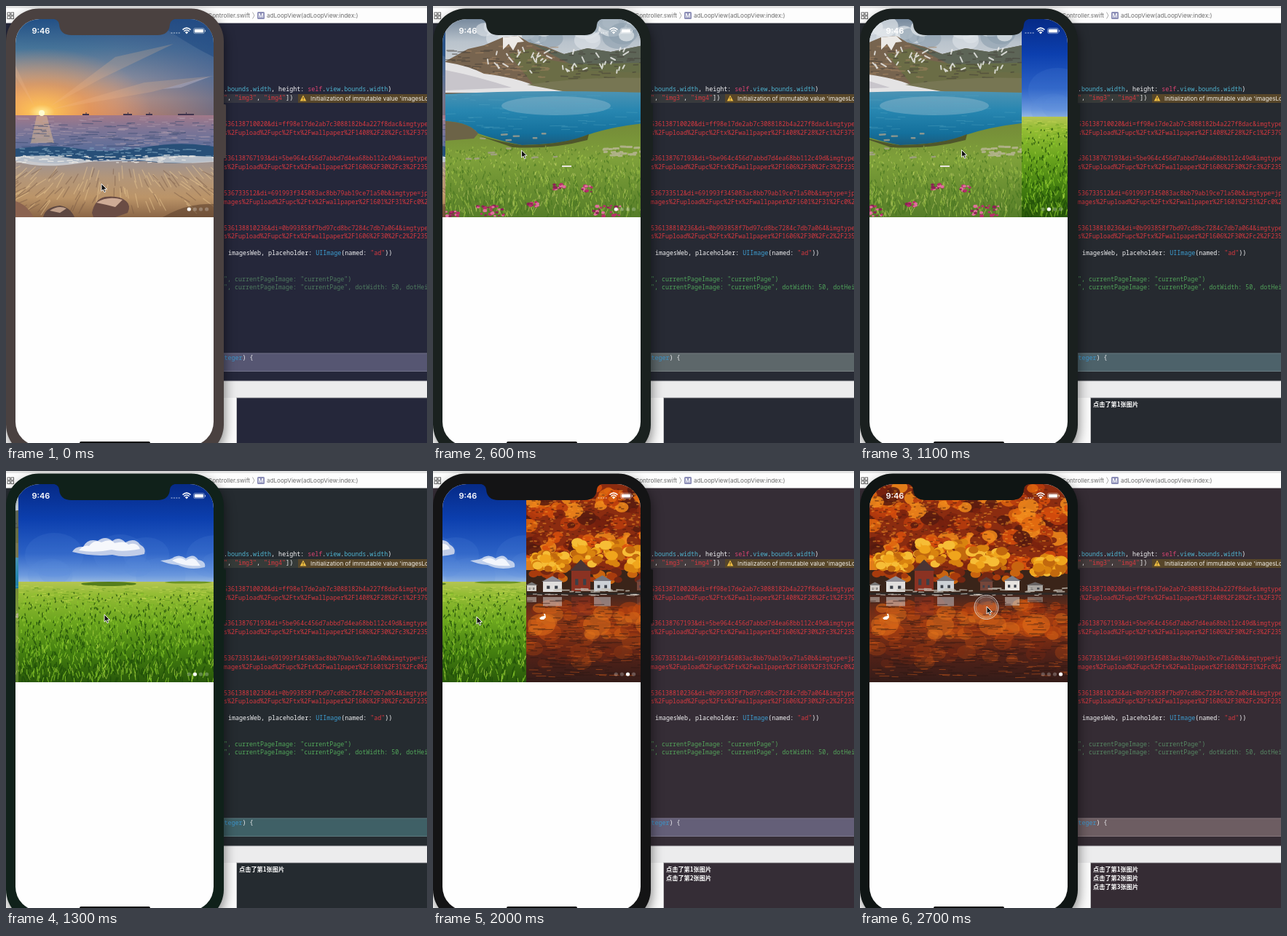
These frames come from a looping animation (578 px wide and 600 px high, 2800 ms). An HTML page:

```html
<!DOCTYPE html>
<html lang="en">
<head>
<meta charset="utf-8">
<title>Ad loop view</title>
<style>
html, body { margin: 0; width: 100%; height: 100%; overflow: hidden; background: #25273a; }
svg { display: block; }
text { white-space: pre; }
.ui { font-family: Inter, sans-serif; font-size: 8.1px; }
.code { font: 500 8.36px "Noto Sans Mono", monospace; }
.log { font: 700 8.2px "Noto Sans CJK SC", "Noto Sans CJK", sans-serif; fill: #fff; }
</style>
</head>
<body>
<svg id="stage" width="578" height="600" viewBox="0 0 578 600"></svg>
<script>
const LOOP = 2800, STEP = 100, PAGE = 272;
const stage = document.getElementById('stage');

let seed = 7;
function rnd() {
  seed = (seed + 0x6D2B79F5) | 0;
  let v = Math.imul(seed ^ (seed >>> 15), 1 | seed);
  v = (v + Math.imul(v ^ (v >>> 7), 61 | v)) ^ v;
  return ((v ^ (v >>> 14)) >>> 0) / 4294967296;
}
const span = (a, b) => a + rnd() * (b - a);
const f = v => v.toFixed(1);
const esc = s => s.replace(/&/g, '&amp;').replace(/</g, '&lt;');

const rect = (x, y, w, h, fill, more = '') =>
  `<rect x="${x}" y="${y}" width="${w}" height="${h}" fill="${fill}" ${more}/>`;
const ell = (x, y, rx, ry, fill, more = '') =>
  `<ellipse cx="${f(x)}" cy="${f(y)}" rx="${f(rx)}" ry="${f(ry)}" fill="${fill}" ${more}/>`;
const path = (d, fill, more = '') => `<path d="${d}" fill="${fill}" ${more}/>`;
const stops = list => list.map(([o, c, a = 1]) =>
  `<stop offset="${o}" stop-color="${c}" stop-opacity="${a}"/>`).join('');
const down = (id, list) => `<linearGradient id="${id}" x2="0" y2="1">${stops(list)}</linearGradient>`;
const across = (id, list) => `<linearGradient id="${id}">${stops(list)}</linearGradient>`;
const glow = (id, list) => `<radialGradient id="${id}">${stops(list)}</radialGradient>`;

// many short strokes of one colour in a single path
function strokes(n, color, width, mark, alpha = 1) {
  let d = '';
  for (let i = 0; i < n; i++) d += mark();
  return path(d, 'none', `stroke="${color}" stroke-width="${width}" stroke-opacity="${alpha}" stroke-linecap="round"`);
}
const line = (x, y, dx, dy) => `M${f(x)} ${f(y)}l${f(dx)} ${f(dy)}`;
const dashes = (n, color, w, y0, y1, min, max, alpha, x0 = 13, x1 = 285) =>
  strokes(n, color, w, () => line(span(x0, x1), span(y0, y1), span(min, max), span(-.5, .5)), alpha);
const blades = (n, color, w, y0, y1, alpha) => strokes(n, color, w, () => {
  const k = rnd(), y = y0 + (y1 - y0) * k;
  return line(span(13, 285), y, span(-3, 3) * (k + .2), -1 - 6 * k);
}, alpha);
function blobs(n, colors, x0, x1, y0, y1, r0, r1, alpha = 1) {
  let s = '';
  for (let i = 0; i < n; i++) {
    const r = span(r0, r1);
    s += ell(span(x0, x1), span(y0, y1), r, r * .75, colors[i % colors.length], `opacity="${alpha}"`);
  }
  return s;
}

function sunset() {
  const ship = (x, w) => rect(x, 148, w, 2, '#40354d') + rect(x + w / 2, 146, 1, 3, '#40354d');
  return rect(13, 18, PAGE, 133, 'url(#dusk)') +
    rect(13, 18, PAGE, 133, 'url(#east)') +
    ell(49, 146, 150, 88, 'url(#sunlight)') +
    path('M40 140L13 96V82ZM60 138L150 70 230 52 130 100ZM62 142L190 105 285 96 200 118Z', '#f2b98c', 'opacity=".22"') +
    path('M200 18H285V70Q245 50 200 18Z', '#123f7c', 'opacity=".4"') +
    path('M215 114L262 101 280 97 240 112Z', '#b5b0c2', 'opacity=".5"') +
    rect(13, 150, PAGE, 68, 'url(#sea)') +
    ell(49, 147, 4, 4, '#fffbd0') +
    path('M42 151H56L66 188H34Z', '#ffd08a', 'opacity=".4"') +
    ship(105, 9) + ship(161, 12) + ship(192, 9) + ship(236, 22) +
    dashes(130, '#b5a2b0', 1, 153, 192, 4, 16, .5) +
    dashes(90, '#34466f', 1.2, 158, 194, 5, 18, .5) +
    rect(13, 213, PAGE, 77, 'url(#sand)') +
    path('M13 196Q60 189 100 196T190 194T285 193V212Q235 219 190 213T100 214T13 208Z', '#274f78') +
    dashes(90, '#86abc2', 1.4, 194, 209, 2, 8, .6) +
    path('M13 207Q55 203 96 210T180 210T285 207V214Q238 218 196 213T100 216T13 213Z', '#d0d3d7', 'opacity=".85"') +
    dashes(80, '#f1eee8', 1.3, 205, 215, 2, 8, .8) +
    strokes(70, '#f0ce98', 1.2, () => {
      const x = span(13, 285), y = span(219, 272);
      return line(x, y, (x - 150) * .14, span(8, 20));
    }, .45) +
    strokes(60, '#6e523f', 1.3, () => {
      const x = span(13, 285), y = span(220, 274);
      return line(x, y, (x - 150) * .13, span(6, 16));
    }, .4) +
    path('M118 284Q122 265 136 262 156 260 165 268 172 274 167 284L150 290H120Z', '#6a4c44') +
    path('M124 270Q140 260 160 266L150 276 138 273Z', '#ceab96') +
    path('M51 290Q54 276 74 274 88 276 94 290Z', '#5d4741') +
    path('M60 281Q72 273 83 278L74 284Z', '#c0a08b') +
    path('M13 268Q28 272 38 290H13Z', '#8b6350') +
    path('M215 290Q250 270 285 272V290Z', '#60442f', 'opacity=".6"');
}

function lake() {
  return rect(13, 18, PAGE, 62, 'url(#haze)') +
    blobs(26, ['#dfe4e9', '#8d9eae', '#f1f3f5'], 13, 285, 18, 48, 8, 22, .6) +
    path('M13 76L44 59 66 54 92 43 113 41 128 50 152 56 176 66 208 58 240 63 285 54V122H13Z', '#77644f') +
    path('M128 50L176 66 208 58 240 63 285 54V92L200 88Z', '#5d6557') +
    path('M100 66L132 58 156 74 190 80 285 78V116H140Z', '#687044', 'opacity=".8"') +
    dashes(110, '#433d36', 1.6, 60, 105, 3, 13, .5) +
    dashes(60, '#a88663', 1.6, 54, 100, 3, 11, .55, 40, 160) +
    strokes(42, '#f0f0ef', 2, () => line(span(70, 275), span(56, 90), span(-7, 7), span(2, 7)), .8) +
    path('M92 43L113 41 121 49 112 50 106 61 100 52 92 60Z', '#eceae7') +
    path('M13 77Q45 82 66 93 108 98 132 108 165 112 235 116L200 120 13 119Z', '#e4e3e4') +
    path('M13 88Q55 96 104 112L13 116Z', '#c8c5cb') +
    path('M125 108Q210 96 285 99V120H190Z', '#777653') +
    path('M13 121Q130 114 285 119V172Q200 196 116 194 60 186 13 164Z', 'url(#water)') +
    ell(165, 137, 75, 13, '#a4c3d1', 'opacity=".38"') +
    dashes(60, '#5aa8c4', 1, 122, 176, 5, 22, .35) +
    path('M13 158Q46 160 58 175 90 186 118 191 178 190 205 178 240 166 285 161V290H13Z', 'url(#meadow)') +
    path('M13 158Q46 160 58 175L52 182 13 185Z', '#6c6347') +
    path('M56 177Q90 187 118 191 178 190 210 176L208 184Q160 197 105 194Z', '#4f562b') +
    blades(420, '#3f6f1d', 1.2, 196, 290, .65) +
    blades(430, '#a8c94c', 1.1, 192, 290, .65) +
    blades(150, '#d0d977', .9, 200, 290, .6) +
    dashes(22, '#c0b8a0', 3, 193, 206, 2, 7, .75, 230, 285) +
    dashes(14, '#a7a18e', 2.4, 174, 214, 2, 8, .8, 20, 175) +
    rect(173, 219, 13, 2, '#e9e5dd') +
    [[75, 282, 21, 7], [234, 281, 21, 8], [168, 249, 9, 4], [206, 251, 8, 4], [22, 286, 9, 4], [133, 272, 7, 3]]
      .map(([x, y, w, h]) => blobs(w + 4, ['#b72e6a', '#df6f9c', '#8b2454'], x - w, x + w, y - h, y + h, 1.4, 3)).join('');
}

function field() {
  return rect(13, 18, PAGE, 136, 'url(#azure)') +
    blobs(9, ['#5b8bdb'], 30, 285, 112, 148, 18, 42, .16) +
    path('M87 111Q91 103 102 104 108 92 122 96 132 88 142 96 151 89 160 98 173 91 180 101 189 106 186 114 160 120 142 115 115 118 87 111Z', '#c1cde8') +
    path('M96 109Q103 101 110 103 118 93 127 98 139 92 145 99 160 95 164 101 176 97 180 107 155 112 141 108 118 113 96 109Z', '#f6f8fc') +
    path('M208 123Q223 122 227 118 235 114 243 120 254 112 260 122 271 124 269 132 248 137 232 129 218 128 208 123Z', '#c0d0ec') +
    path('M224 123Q235 116 243 123 253 116 259 125L263 130Q242 132 224 123Z', '#f3f6fc') +
    rect(13, 152, PAGE, 138, 'url(#grass)') +
    ell(137, 155, 38, 3, '#557d1c') + ell(246, 153, 32, 1.6, '#6d9525') +
    dashes(140, '#d2df5c', 1, 156, 180, 2, 7, .45) +
    dashes(120, '#4e8a16', 1, 160, 190, 2, 6, .45) +
    blades(620, '#1d4a08', 1.5, 168, 292, .75) +
    blades(620, '#8dcc2b', 1.1, 168, 292, .75) +
    blades(210, '#c1e750', .9, 176, 292, .65);
}

function autumn() {
  const house = (x, y, w, h, wall, roof) =>
    rect(x, y, w, h, wall) +
    path(`M${x - 2} ${y}L${x + w / 2} ${y - h * .55}L${x + w + 2} ${y}Z`, roof) +
    rect(x + w * .2, y + h * .4, w * .16, h * .3, '#3c4048') +
    rect(x + w * .62, y + h * .4, w * .16, h * .3, '#3c4048') +
    rect(x, 173, w, h * .9, wall, 'opacity=".5"');
  const tree = (x, y, w, h) => blobs(50, ['#f0a51c', '#d9830f', '#f6bd36', '#c2690e'], x - w, x + w, y - h, y + h, 3, 9);
  return rect(13, 18, PAGE, 152, '#8b2c10') +
    blobs(190, ['#b83b0e', '#e0660f', '#7a210f', '#d84e0c', '#f08a1c', '#571b10'], 10, 288, 22, 130, 5, 15, .85) +
    dashes(420, '#f79a28', 1.8, 22, 135, 1, 4, .5) +
    dashes(330, '#4a180e', 1.7, 24, 138, 1, 4, .5) +
    rect(13, 136, PAGE, 32, '#3a2419') +
    blobs(50, ['#a83b0d', '#732612', '#c9640f'], 13, 285, 130, 150, 4, 9) +
    tree(111, 113, 32, 16) + tree(176, 120, 24, 14) + tree(46, 124, 22, 11) + tree(258, 130, 20, 11) +
    rect(13, 168, PAGE, 122, 'url(#pond)') +
    blobs(70, ['#b9430e', '#e1721a', '#862a10', '#cb510f'], 13, 285, 184, 226, 6, 17, .5) +
    blobs(28, ['#bd4d12', '#7c2a12'], 13, 285, 228, 265, 6, 16, .32) +
    [34, 110, 182, 242].map(x => ell(x, 211, 19, 15, '#e3731a', 'opacity=".5"')).join('') +
    house(75, 137, 26, 28, '#8b3222', '#4b3433') +
    house(36, 152, 26, 14, '#e1dfdd', '#8f8d95') +
    house(106, 151, 23, 14, '#ccd0d5', '#74747d') +
    house(199, 151, 20, 13, '#e6e3df', '#7d7e86') +
    house(165, 152, 17, 12, '#75463a', '#593d38') +
    house(230, 157, 21, 8, '#a9a5a0', '#686464') +
    house(14, 157, 13, 8, '#d2cfca', '#777') +
    dashes(30, '#c3beb4', 1.7, 161, 167, 4, 12, .8) +
    rect(13, 167, PAGE, 3, '#2e2825') +
    dashes(24, '#e3ddd2', 1, 169, 171, 3, 9, .8) +
    dashes(310, '#2d1713', 1.2, 176, 288, 5, 20, .5) +
    dashes(170, '#d05b1b', 1, 186, 285, 4, 15, .5) +
    path('M31 202Q34 199 38 199L37 196 39 196 40 201 37 204H33Z', '#fff');
}

const defs = `<defs>
  <clipPath id="screen"><rect x="13" y="18" width="272" height="586" rx="33"/></clipPath>
  <clipPath id="banner"><rect x="13" y="18" width="272" height="272"/></clipPath>
  <filter id="soft" x="-20%" y="-20%" width="140%" height="140%"><feGaussianBlur stdDeviation="8"/></filter>` +
  down('dusk', [[0, '#214f85'], [.3, '#477599'], [.6, '#9296a0'], [.82, '#d3a184'], [1, '#d98c63']]) +
  across('east', [[0, '#2c5a8c', 0], [.5, '#54608e', .2], [1, '#35568e', .6]]) +
  glow('sunlight', [[0, '#fff2a0'], [.12, '#ffc255', .9], [.45, '#f79b4c', .6], [1, '#f0a070', 0]]) +
  down('sea', [[0, '#a27989'], [.3, '#7d7596'], [.7, '#5b6d99'], [1, '#2c4f78']]) +
  down('sand', [[0, '#9d9291'], [.3, '#b39679'], [.65, '#bb9468'], [1, '#8a6546']]) +
  down('haze', [[0, '#77899d'], [.5, '#b9c3cc'], [1, '#cdd2d6']]) +
  down('water', [[0, '#4c93b4'], [.35, '#2786b0'], [.75, '#14709c'], [1, '#1c5878']]) +
  down('meadow', [[0, '#748a38'], [.4, '#7ea03a'], [1, '#557d28']]) +
  down('azure', [[0, '#062a86'], [.35, '#0c3fae'], [.7, '#2c62c6'], [.92, '#6d9ade'], [1, '#9dbce0']]) +
  down('grass', [[0, '#b5c552'], [.12, '#95bd35'], [.4, '#6ba51e'], [.7, '#447f10'], [1, '#29580a']]) +
  down('pond', [[0, '#42261e'], [.2, '#6e2c17'], [.4, '#8c3514'], [.65, '#562217'], [1, '#341c19']]) +
  '</defs>';

const W = '#f4f4f6', RED = '#d9383f', CYAN = '#4fb3cf', PINK = '#dc4371', BLUE = '#3d9fd3';
const code = (x, y, parts, more = '') => `<text class="code" x="${x}" y="${y}" ${more}>` +
  parts.map(([c, s]) => `<tspan fill="${c}">${esc(s)}</tspan>`).join('') + '</text>';
const ui = (x, y, s, fill, more = '') => `<text class="ui" x="${x}" y="${y}" fill="${fill}" ${more}>${s}</text>`;

const tail = (dir, end) => `%2Fupload%2Fupc%2Ftx%2Fwallpaper%2F${dir}${end}`;
const urls = [
  [165, '536138710020&di=ff98e17de2ab7c3088182b4a227f8dac&imgtype'],
  [177, 's' + tail('1408%2F28%2Fc1', '%2F379')],
  [212, '536138767193&di=5be964c456d7abbd7d4ea68bb112c49d&imgtype'],
  [224, 's' + tail('1606%2F30%2Fc3', '%2F235')],
  [260, '536733512&di=691993f345083ac8bb79ab19ce71a50b&imgtype=jp'],
  [272, 'mages' + tail('1601%2F31%2Fc0', '%2')],
  [308, '536138810236&di=0b993858f7bd97cd8bc7284c7db7a064&imgtype'],
  [319, 's' + tail('1606%2F30%2Fc2', '%2F235')]
];

const editor =
  rect(0, 0, 578, 600, '#25273a', 'id="bg"') +
  rect(0, 0, 578, 23.5, '#fdfdfd') + rect(0, 0, 578, 3, '#e4e4e4') +
  [[2, 9], [7, 9], [2, 14], [7, 14]].map(([x, y]) =>
    rect(x, y, 3.6, 3.6, 'none', 'stroke="#555" stroke-width=".9"')).join('') +
  ui(335, 16, 'ViewController.swift', '#6b6b6b', 'text-anchor="end"') +
  path('M338.5 8.5L341 13 338.5 17.5', 'none', 'stroke="#999" stroke-width=".8"') +
  rect(345, 8, 10, 10, '#8b8db6', 'rx="1.5"') +
  ui(350, 16, 'M', '#fff', 'text-anchor="middle" font-weight="600"') +
  ui(358, 16, 'adLoopView(adLoopView:index:)', '#6b6b6b') +
  code(299, 117, [[W, '.'], [CYAN, 'bounds'], [W, '.'], [CYAN, 'width'], [W, ', height: '], [PINK, 'self'], [W, '.'],
    [CYAN, 'view'], [W, '.'], [CYAN, 'bounds'], [W, '.'], [CYAN, 'width'], [W, ')']]) +
  rect(299, 121, 102, 12, '#ffe9a0', 'opacity=".08"') + rect(401, 121, 177, 12, '#574629') +
  code(299, 129, [[RED, '"'], [W, ', '], [RED, '"img3"'], [W, ', '], [RED, '"img4"'], [W, '])']]) +
  path('M408 122.5L412.3 130.5H403.7Z', '#f1c044') + rect(407.6, 125, .9, 3, '#443311') + rect(407.6, 128.7, .9, .9, '#443311') +
  ui(418, 129.5, "Initialization of immutable value 'imagesLocal'", '#f1eee8') +
  urls.map(([y, s]) => code(299, y, [[RED, s]])).join('') +
  code(305, 342, [[W, 'imagesWeb, placeholder: '], [BLUE, 'UIImage'], [W, '(named: '], [RED, '"ad"'], [W, '))']]) +
  '<g id="notes">' +
  code(299, 378, [['inherit', '", currentPageImage: "currentPage")']]).replace('fill="inherit"', '') +
  code(299, 389, [['inherit', '", currentPageImage: "currentPage", dotWidth: 50, dotHeight']]).replace('fill="inherit"', '') +
  '</g>' +
  rect(299, 476.5, 279, 25.5, '#565672', 'id="row"') +
  rect(299, 476.5, 279, .8, '#fff', 'opacity=".2"') + rect(299, 501.2, 279, .8, '#fff', 'opacity=".2"') +
  code(299.5, 486, [['#3c94c9', 'teger'], [W, ') {']]) +
  rect(299, 515, 279, 23, '#ececed') + rect(299, 514.5, 279, .8, '#b8b8bb') +
  rect(0, 538, 316, 62, '#fbfbfb') + rect(316, 537.5, 262, .8, '#a5a5a8') + rect(316, 538, 1, 62, '#c4c4c6') +
  [1, 2, 3].map(n => `<text class="log" id="log${n}" x="320" y="${538 + 12 * n}">点击了第${n}张图片</text>`).join('');

const phone =
  '<rect x="3" y="10" width="297" height="615" rx="45" fill="#000" opacity=".5" filter="url(#soft)"/>' +
  '<g id="bezel">' + '<rect x="297" y="135" width="5" height="74" rx="1.5"/><rect x="0" y="3.5" width="299" height="616" rx="45"/></g>' +
  '<g clip-path="url(#screen)">' + rect(13, 18, 272, 586, '#fefefe') +
  '<g clip-path="url(#banner)"><g id="pages">' +
  [sunset, lake, field, autumn].map((draw, i) =>
    `<g transform="translate(${i * PAGE})"><svg x="13" y="18" width="272" height="272" viewBox="13 18 272 272">${draw()}</svg></g>`).join('') +
  '</g></g></g>' +
  [0, 1, 2, 3].map(i => `<circle id="dot${i}" cx="${251.3 + i * 8.1}" cy="279" r="2.6" fill="#fff"/>`).join('') +
  '<path id="notch" d="M62 17Q72 18 73 25 74 40 90 40H208Q224 40 225 25 226 18 236 17Z"/>' +
  '<text x="35.5" y="38" fill="#fff" font-family="Inter, sans-serif" font-size="11" font-weight="600">9:46</text>' +
  [0, 1, 2, 3].map(i => rect(226.5 + i * 3.4, 36.2, 2, 1.6, '#fff', 'opacity=".45"')).join('') +
  path('M242.5 32.6Q248 27.6 253.5 32.6M244.3 34.7Q248 31.3 251.7 34.7', 'none', 'stroke="#fff" stroke-width="1.5"') +
  path('M245.8 36Q248 34.2 250.2 36L248 38.4Z', '#fff') +
  rect(257.5, 30.5, 14.8, 7.2, 'none', 'rx="2" stroke="#fff" stroke-opacity=".6" stroke-width=".7"') +
  rect(258.7, 31.7, 12.4, 4.8, '#fff', 'rx="1"') + rect(273, 32.8, 1, 2.6, '#fff', 'rx=".5" opacity=".7"') +
  rect(101, 598, 97, 4, '#050505', 'rx="2"');

const pointer = '<g id="pointer"><g id="ring">' +
  '<circle cx="-.5" cy="1" r="16.5" fill="#fff" fill-opacity=".1" stroke="#ddd" stroke-opacity=".85"/>' +
  '<circle cx="-.5" cy="1" r="14.3" fill="none" stroke="#ccc" stroke-opacity=".55" stroke-width=".8"/></g>' +
  path('M0 0V10.2L2.4 8 4 11.8 5.8 11 4.2 7.4H7.4Z', '#111', 'stroke="#fff" stroke-width=".9"') + '</g>';

stage.innerHTML = defs + editor + phone + pointer;

const el = id => document.getElementById(id);
const logs = [800, 1600, 2700], clicks = [700, 1500, 2600];

// time, scroll offset
const scrollKeys = [[0, 0], [100, 0], [200, 20], [300, 88], [400, 175], [500, 245], [600, 268], [700, 272],
  [1000, 272], [1100, 335], [1200, 485], [1300, 540], [1400, 544], [1800, 544], [1900, 605], [2000, 701],
  [2100, 782], [2200, 811], [2300, 816]];
// time, x, y
const pointerKeys = [[0, 131, 244], [200, 190, 204], [300, 150, 200], [400, 80, 199], [500, 75, 199], [700, 168, 197],
  [800, 181, 197], [1000, 184, 197], [1200, 95, 198], [1300, 135, 197], [1400, 141, 197], [1700, 141, 197],
  [1800, 155, 199], [2000, 60, 200], [2100, 60, 199], [2400, 165, 189], [2500, 174, 186]];
// time, bezel, editor, selected row, comments
const toneKeys = [
  [0, '#4a4140', '#25273a', '#565672', '#4f7a5f'],
  [400, '#14231d', '#272b36', '#5f6967', '#4fa65c'],
  [900, '#231e23', '#262930', '#5a646e', '#509b58'],
  [1300, '#10211a', '#252b30', '#3f6066', '#52a75a'],
  [1700, '#1d201a', '#282c30', '#4f6c6b', '#4c9453'],
  [2000, '#141415', '#352d36', '#645f78', '#54a45a'],
  [2700, '#0f1514', '#352c34', '#6d5d62', '#568763']
].map(([t, ...tones]) => [t, ...tones.flatMap(c => [1, 3, 5].map(i => parseInt(c.slice(i, i + 2), 16)))]);

function at(keys, t) {
  let i = keys.length - 1;
  while (i > 0 && keys[i][0] > t) i--;
  const a = keys[i], b = keys[i + 1] || a;
  const k = b === a ? 0 : (t - a[0]) / (b[0] - a[0]);
  return a.slice(1).map((v, j) => v + (b[j + 1] - v) * k);
}

function render(t) {
  const [offset] = at(scrollKeys, t);
  el('pages').setAttribute('transform', `translate(${-offset})`);
  const page = Math.floor(offset / PAGE);
  for (let i = 0; i < 4; i++) el('dot' + i).setAttribute('opacity', i === page ? 1 : .25);

  const [x, y] = at(pointerKeys, t);
  el('pointer').setAttribute('transform', `translate(${x} ${y})`);
  el('ring').style.display = clicks.some(c => t >= c && t < c + 200) ? '' : 'none';
  logs.forEach((start, i) => { el('log' + (i + 1)).style.display = t >= start ? '' : 'none'; });

  const tones = at(toneKeys, t);
  const tone = i => `rgb(${tones.slice(i * 3, i * 3 + 3).map(Math.round)})`;
  el('bezel').setAttribute('fill', tone(0));
  el('notch').setAttribute('fill', tone(0));
  el('bg').setAttribute('fill', tone(1));
  el('row').setAttribute('fill', tone(2));
  el('notes').setAttribute('fill', tone(3));
}

function tick() {
  render(Math.floor(performance.now() % LOOP / STEP) * STEP);
  requestAnimationFrame(tick);
}
tick();
</script>
</body>
</html>
```
